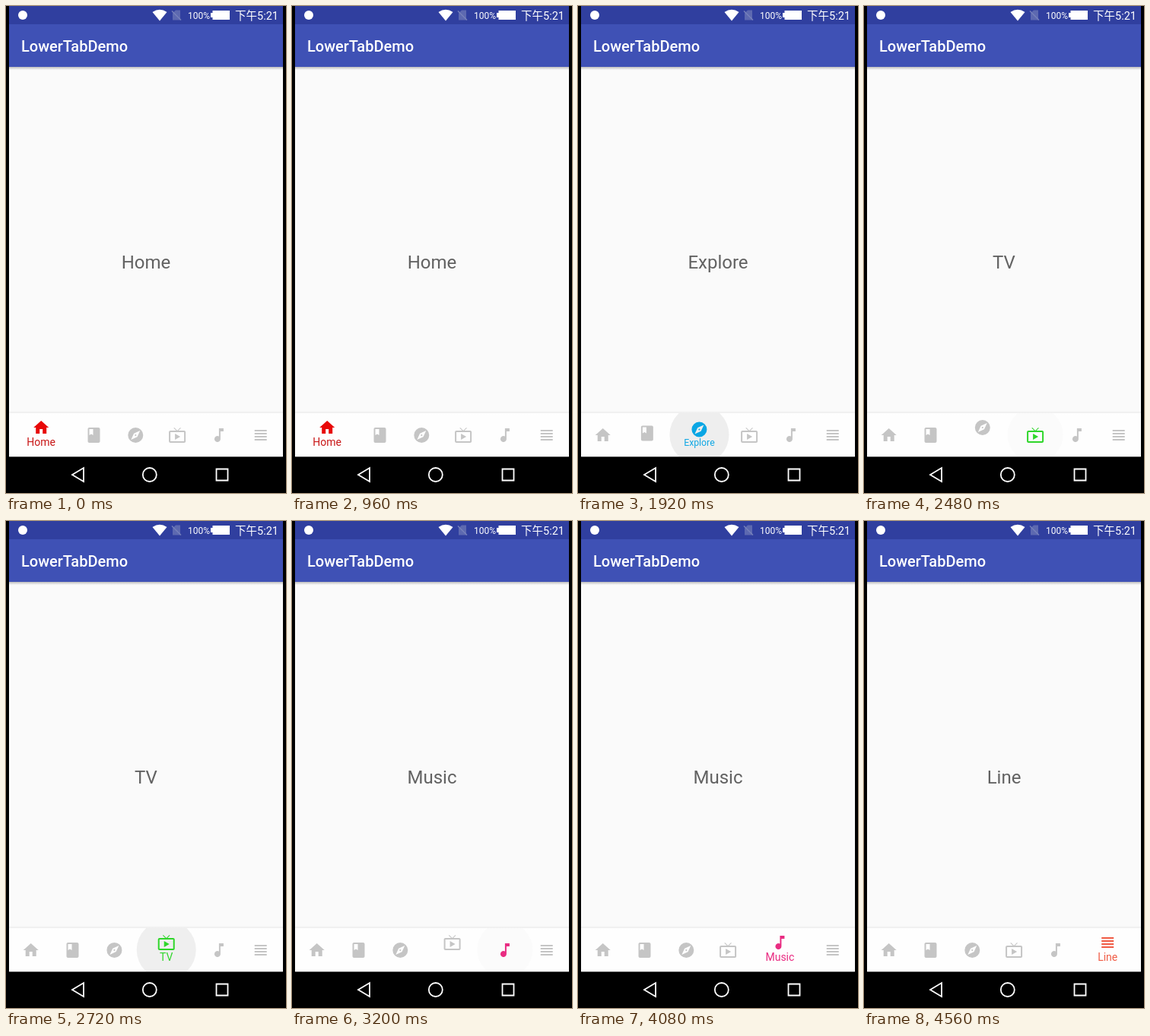
Recreate the animation shown at these times as an HTML page with a canvas. Size 368 px wide and 640 px high, loop 4600 ms.

```html
<!DOCTYPE html>
<html lang="en">
<head>
<meta charset="utf-8">
<title>Bottom navigation</title>
<style>
html, body { margin: 0; height: 100%; overflow: hidden; background: #000; }
canvas { display: block; }
</style>
</head>
<body>
<canvas id="stage" width="368" height="640"></canvas>
<script>
const ctx = document.getElementById('stage').getContext('2d');
const LOOP = 4600, PAGE = '#fafafa', IDLE = '#c5c5c5', DIM = '#7680ba';
const ROBOTO = 'Roboto, sans-serif';

// start: moment the tab becomes selected; icons live on a 24 x 24 grid
const tabs = [
  { name: 'Home', start: -1e4, color: '#e80808', text: '#c81616',
    icon: 'M10 20v-6h4v6h5v-8h3L12 3 2 12h3v8z' },
  { name: 'Book', start: 990, color: '#ecd61a',
    icon: 'M18 2H6c-1.1 0-2 .9-2 2v16c0 1.1.9 2 2 2h12c1.1 0 2-.9 2-2V4c0-1.1-.9-2-2-2zM6 4h5v8l-2.5-1.5L6 12z' },
  { name: 'Explore', start: 1750, color: '#0aa6e4',
    icon: 'M12 10.9a1.1 1.1 0 1 0 0 2.2 1.1 1.1 0 0 0 0-2.2zM12 2a10 10 0 1 0 0 20 10 10 0 0 0 0-20zm2.19 12.19L6 18l3.81-8.19L18 6z' },
  { name: 'TV', start: 2470, color: '#2fd62a',
    icon: 'M21 6h-7.59l3.29-3.29L16 2l-4 4-4-4-.71.71L10.59 6H3c-1.1 0-2 .89-2 2v12c0 1.1.9 2 2 2h18c1.1 0 2-.9 2-2V8c0-1.11-.9-2-2-2zm0 14H3V8h18zM9 10v8l7-4z' },
  { name: 'Music', start: 3190, color: '#e92c82',
    icon: 'M12 3v10.55A4 4 0 1 0 14 17V7h4V3z' },
  { name: 'Line', start: 4110, color: '#f05c45',
    icon: 'M4 15h16v-2H4zm0 4h16v-2H4zm0-8h16V9H4zm0-6v2h16V5z' }
];
for (const tab of tabs) tab.path = new Path2D(tab.icon);

const clamp = x => Math.max(0, Math.min(1, x));
const mix = (a, b, p) => a + (b - a) * p;
const ease = x => {
  const u = 1 - (1 - clamp(x)) ** 1.6;
  return u * u * (3 - 2 * u);
};

function rect(x, y, w, h, color) {
  ctx.fillStyle = color;
  ctx.fillRect(x, y, w, h);
}

function text(str, x, y, font, color, align = 'center') {
  ctx.font = font;
  ctx.fillStyle = color;
  ctx.textAlign = align;
  ctx.fillText(str, x, y);
}

function shape(d, color, stroke) {
  const path = new Path2D(d);
  ctx.fillStyle = ctx.strokeStyle = color;
  ctx.lineWidth = stroke;
  stroke ? ctx.stroke(path) : ctx.fill(path);
}

function shadow(y, h, from, to) {
  const g = ctx.createLinearGradient(0, y, 0, y + h);
  g.addColorStop(0, from);
  g.addColorStop(1, to);
  rect(4, y, 360, h, g);
}

function drawFrame(page) {
  rect(0, 0, 368, 640, '#000');
  rect(4, 0, 360, 592, PAGE);
  rect(4, 592, 360, 1, '#555');
  rect(4, 0, 360, 24, '#303f9f');
  rect(4, 24, 360, 56, '#3f51b5');
  shadow(80, 4, '#bdbdbd', PAGE);
  text('LowerTabDemo', 20, 60, `500 20px ${ROBOTO}`, '#fff', 'left');
  text(page, 184, 345, `24px ${ROBOTO}`, '#626262');

  // status bar
  shape('M28 12a6 6 0 1 1-12 0a6 6 0 1 1 12 0z', '#fff');
  shape('M202 19.5L192.5 8Q202 1.5 211.5 8z', '#fff');
  shape('M223 5.5h6v13h-10v-9z', '#5d69b0');
  shape('M218 6.5L230 18.5', DIM, 1.5);
  text('100%', 239, 17, `12px ${ROBOTO}`, '#fff', 'left');
  shape('M271.5 6H294V18H271.5V15H269V9H271.5z', '#fff');
  text('下午5:21', 301, 17.5, '14.5px Roboto, "Noto Sans CJK SC", "Noto Sans CJK", sans-serif', '#fff', 'left');

  // system buttons
  shape('M87 616L102 607V625z', '#fff', 1.8);
  shape('M197.8 616a9 9 0 1 1-18 0a9 9 0 1 1 18 0z', '#fff', 1.8);
  shape('M276.5 608.5h15v15h-15z', '#fff', 1.8);
}

function centerX(k, active) {
  return 32.7 + 54.8 * k + (k === active ? 13.5 : k > active ? 28 : 0);
}

function drawRipple(x, age) {
  const alpha = Math.min(clamp((age + 10) / 120), clamp((430 - age) / 190));
  if (!alpha) return;
  ctx.globalAlpha = alpha;
  ctx.fillStyle = '#eee';
  ctx.beginPath();
  ctx.arc(x, 563.5, mix(35, 39, clamp((age + 80) / 240)), 0, 7);
  ctx.fill();
  ctx.globalAlpha = 1;
}

function drawTabs(active, age) {
  const p = ease((age - 50) / 240);
  const prev = Math.max(0, active - 1);
  const xOf = k => mix(centerX(k, prev), centerX(k, active), p);
  shadow(532, 3, PAGE, '#ececec');
  rect(4, 535, 360, 57, '#fefefe');

  ctx.save();
  ctx.beginPath();
  ctx.rect(4, 535, 360, 57);
  ctx.clip();
  drawRipple(xOf(active), age);
  tabs.forEach((tab, k) => {
    const on = k === active;
    const lift = on ? p : k === prev ? 1 - p : 0;
    const x = xOf(k);
    ctx.save();
    ctx.translate(x - 12, mix(552, 542, lift));
    ctx.fillStyle = on ? tab.color : IDLE;
    ctx.fill(tab.path, 'evenodd');
    ctx.restore();
    if (!on) return;
    ctx.save();
    ctx.globalAlpha = clamp(p * 1.3);
    ctx.translate(x, 578);
    ctx.scale(mix(0.5, 1, p), mix(0.5, 1, p));
    text(tab.name, 0, 0, `14px ${ROBOTO}`, tab.text || tab.color);
    ctx.restore();
  });
  ctx.restore();
}

function draw(now) {
  const t = now % LOOP;
  const active = tabs.filter(tab => tab.start <= t).length - 1;
  drawFrame(tabs[active].name);
  drawTabs(active, t - tabs[active].start);
}

const begin = performance.now();
function tick() {
  draw(performance.now() - begin);
  requestAnimationFrame(tick);
}
tick();
</script>
</body>
</html>
```
